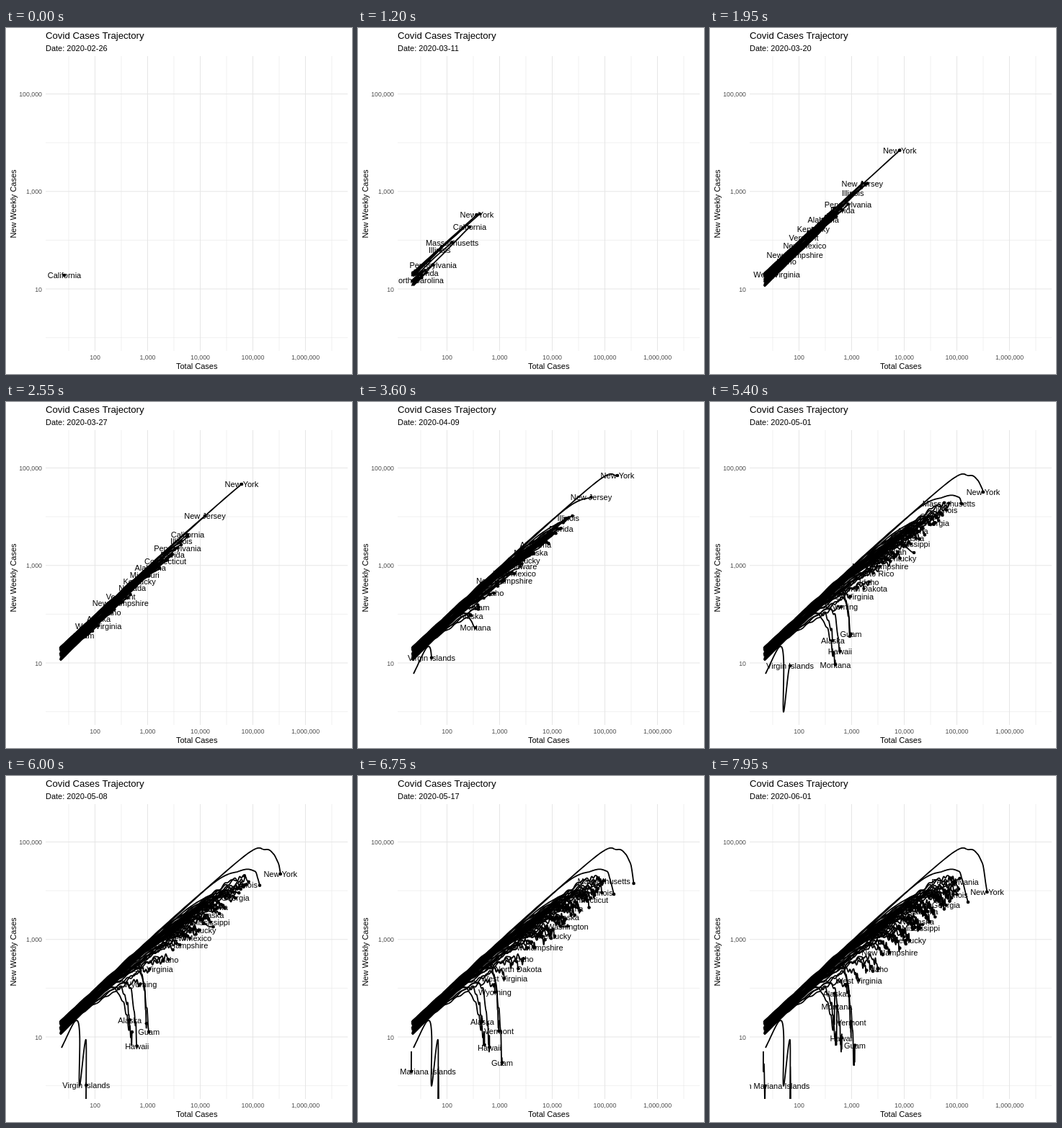
An HTML page with a canvas that plays this animation: 480 by 480 pixels, repeating every 8000 ms.

```html
<!DOCTYPE html>
<html lang="en">
<head>
<meta charset="utf-8">
<title>Covid Cases Trajectory</title>
<style>
html, body { margin: 0; width: 100%; height: 100%; overflow: hidden; background: #fff; }
canvas { display: block; }
</style>
</head>
<body>
<canvas id="stage" width="480" height="480"></canvas>
<script>
const g = document.getElementById('stage').getContext('2d');
const LOOP = 8000, STEP = 150, LAST = 96;
const panel = { l: 55, t: 39, r: 474, b: 448 };
const states = [];

let seed = 11;
const rand = () => (seed = seed * 16807 % 2147483647) / 2147483647;
const ramp = (d, from, to) => Math.min(1, Math.max(0, (d - from) / (to - from)));
const smooth = f => f * f * (3 - 2 * f);
// Weekly cases cannot exceed total cases: the upper edge of the plot
const bound = x => 339.3 - 0.926 * (x - 75);

// Smooth curve through a few waypoints: day, x, y
function path(name, ...pts) {
  const slope = (i, c) => {
    const a = pts[Math.max(0, i - 1)], b = pts[Math.min(pts.length - 1, i + 1)];
    return (b[c] - a[c]) / (b[0] - a[0]);
  };
  const at = d => {
    const i = Math.max(0, pts.findIndex(p => p[0] >= d) - 1);
    const p = pts[i], q = pts[i + 1], h = q[0] - p[0], f = (d - p[0]) / h, e = 1 - f;
    return [1, 2].map(c => p[c] + (q[c] - p[c]) * smooth(f)
      + h * f * e * (e * slope(i, c) - f * slope(i + 1, c)));
  };
  states.push({ name, start: pts[0][0], at });
}

// Totals approach endX while weekly cases sink by drop(day) below the bound
function growth(name, start, endX, rate, drop) {
  const grown = d => 1 - Math.exp(-rate * (d - start));
  const x0 = 74 + rand() * 3, low = rand() * 18, a = rand() * 6, b = rand() * 6;
  const at = d => {
    const x = x0 + (endX - x0) * grown(d) / grown(LAST);
    const sink = drop(d), settle = ramp(d, LAST, LAST - 5);
    const wave = Math.sin(d * 0.9 + a) + Math.sin(d * 0.42 + b);
    const early = low * ramp(d, start + 38, start) + 1 + Math.sin(d * 1.3 + a);
    return [x, bound(x) + sink + settle * (early + wave * ramp(d, 28, 48) * sink * 0.05)];
  };
  states.push({ name, start, at });
}

// Small places whose weekly cases collapse by a given day and then recover
function plunge(name, start, endX, bottomDay, depth, endDepth) {
  growth(name, start, endX, 0.08, d => {
    const fall = smooth(ramp(d, bottomDay - 36, bottomDay));
    return 25 * ramp(d, 26, 43) + (depth - 25) * fall - (depth - endDepth) * ramp(d, 82, LAST);
  });
}

path('New York', [7, 75, 340], [14.5, 165, 259], [30.8, 327, 114], [43.5, 360, 102], [53, 371, 108],
  [58, 376, 117], [65.2, 379, 125], [81.5, 382.5, 149], [96, 384.5, 161]);
path('New Jersey', [10.5, 75, 341], [30.8, 276, 158], [43.5, 323.5, 132], [59, 345, 132],
  [65.2, 349, 141], [81.5, 355, 164], [96, 358, 175]);
path('California', [0, 81, 343], [7, 101, 330], [14.5, 155, 276], [30.8, 252, 184],
  [65.2, 322, 155], [96, 346.5, 142]);
path('Washington', [4, 75, 342], [14.5, 169, 258], [30.8, 243, 198], [65.2, 283, 209], [96, 295, 206]);
path('Virgin Islands', [31, 77, 377], [37, 96, 340], [43.5, 102, 355], [55, 102, 430],
  [65.2, 111, 366], [70, 111, 450], [75, 111.5, 403], [80, 112, 458], [96, 112, 458]);
path('Northern Mariana Islands', [77, 74, 382], [81, 74, 410], [84, 75, 400], [90, 76, 450], [96, 76.5, 430]);

plunge('Guam', 27, 201, 84, 175, 151);
plunge('Hawaii', 20, 183, 75, 133, 124);
plunge('Alaska', 21, 173, 74, 90, 53);
plunge('Montana', 18, 176, 65, 114, 74);
plunge('Vermont', 16, 196, 78, 124, 114);

// The rest, from most to fewest cases
('Massachusetts,Illinois,Pennsylvania,Texas,Florida,Michigan,Maryland,Georgia,Virginia,Connecticut,Louisiana,' +
  'Ohio,Indiana,North Carolina,Colorado,Minnesota,Tennessee,Arizona,Iowa,Wisconsin,Alabama,Mississippi,' +
  'Rhode Island,Nebraska,Missouri,South Carolina,Kansas,Kentucky,Utah,Delaware,District of Columbia,Nevada,' +
  'New Mexico,Arkansas,Oklahoma,South Dakota,New Hampshire,Oregon,Puerto Rico,Idaho,North Dakota,Maine,' +
  'West Virginia,Wyoming').split(',').forEach((name, i, all) => {
  const f = i / (all.length - 1);
  const endX = 345 - 108 * f - 44 * f ** 12;
  const start = 10 + 3.5 * (1 - Math.exp(-i / 2)) + 8 * f ** 3;
  const depth = 52 + 26 * rand();
  growth(name, start, endX, 0.05, d => depth * ramp(d, 26, LAST) ** 0.85);
});

// Labels placed first win when two would overlap
const first = ('Illinois,Massachusetts,Florida,Georgia,New York,New Jersey,Pennsylvania,Indiana,Alabama,Kentucky,' +
  'New Hampshire,Idaho,Nebraska,Guam,Hawaii,Alaska,Montana,Vermont,California').split(',');
const rank = s => first.includes(s.name) ? first.indexOf(s.name) : first.length;
states.sort((a, b) => rank(a) - rank(b));

function text(str, x, y, size, align = 'left', color = '#000') {
  g.font = size + 'px "Liberation Sans", Arial, sans-serif';
  g.textAlign = align;
  g.fillStyle = color;
  g.fillText(str, x, y);
}

function line(x1, y1, x2, y2, width) {
  g.lineWidth = width;
  g.beginPath();
  g.moveTo(x1, y1);
  g.lineTo(x2, y2);
  g.stroke();
}

function drawFrame(date) {
  g.fillStyle = '#fff';
  g.fillRect(0, 0, 480, 480);
  g.strokeStyle = '#e6e6e6';
  for (let i = 0; i < 11; i++) {
    const x = 87 + 36.5 * i;
    line(x, panel.t, x, panel.b, i % 2 ? 1.07 : 0.6);
  }
  for (let i = 0; i < 6; i++) {
    const y = 429.6 - 67.62 * i;
    line(panel.l, y, panel.r, y, i % 2 ? 1.07 : 0.6);
  }
  text('Covid Cases Trajectory', 55, 15, 13.2);
  text('Date: ' + date, 55, 32, 11);
  for (let i = 0; i < 5; i++)
    text((10 ** (i + 2)).toLocaleString('en-US'), 123.5 + 73 * i, 460, 8.8, 'center', '#4d4d4d');
  for (let i = 0; i < 3; i++)
    text((10 ** (2 * i + 1)).toLocaleString('en-US'), 50, 365.5 - 135.25 * i, 8.8, 'right', '#4d4d4d');
  text('Total Cases', 264.7, 473, 11, 'center');
  g.save();
  g.translate(13.5, 244);
  g.rotate(-Math.PI / 2);
  text('New Weekly Cases', 0, 0, 11, 'center');
  g.restore();
}

function trace({ name, start, at }, day) {
  g.beginPath();
  for (let d = start; d < day; d += 0.5) g.lineTo(...at(d));
  const [x, y] = at(day);
  g.lineTo(x, y);
  g.stroke();
  return { name, x, y };
}

function draw(day) {
  const date = new Date(Date.UTC(2020, 1, 26 + Math.floor(day + 1e-6)));
  drawFrame(date.toISOString().slice(0, 10));
  g.save();
  g.beginPath();
  g.rect(panel.l, panel.t, panel.r - panel.l, panel.b - panel.t);
  g.clip();
  g.strokeStyle = '#000';
  g.lineWidth = 1.8;
  g.lineJoin = 'round';
  const heads = states.filter(s => s.start <= day).map(s => trace(s, day));
  g.fillStyle = '#000';
  for (const { x, y } of heads) {
    g.beginPath();
    g.arc(x, y, 2.3, 0, 7);
    g.fill();
  }
  g.font = '11px "Liberation Sans", Arial, sans-serif';
  const placed = [];
  for (const { name, x, y } of heads) {
    const w = g.measureText(name).width / 2;
    if (placed.some(p => Math.abs(p.x - x) < p.w + w && Math.abs(p.y - y) < 8.1)) continue;
    placed.push({ x, y, w });
    text(name, x, y + 4.3, 11, 'center');
  }
  g.restore();
}

let shown = -1;
function tick(now) {
  const n = Math.floor(now % LOOP / STEP);
  if (n !== shown) draw((shown = n) * LAST / 53);
  requestAnimationFrame(tick);
}
draw(0);
requestAnimationFrame(tick);
</script>
</body>
</html>
```
